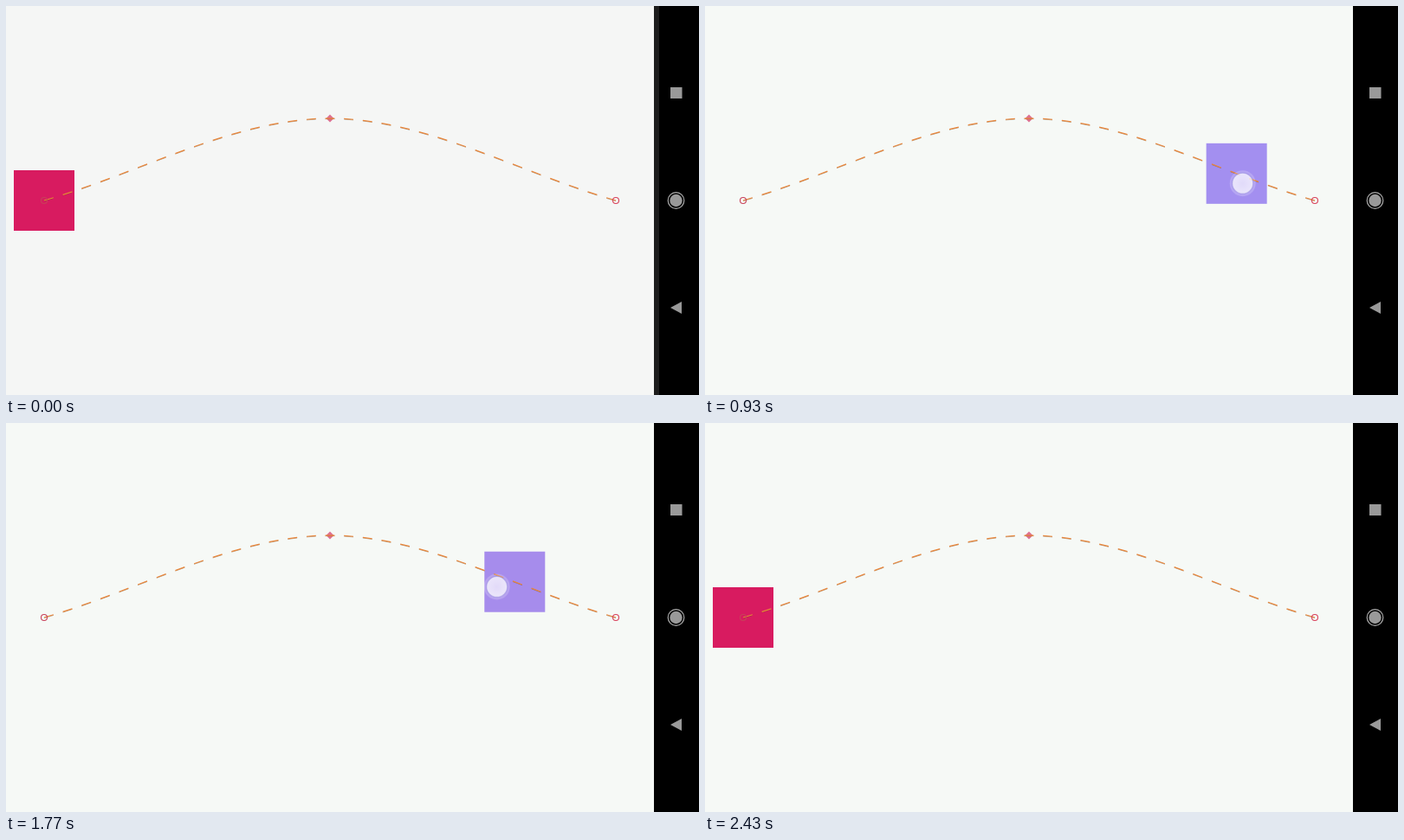
Recreate the animation shown at these times as an HTML page with a canvas. Size 800 by 450 pixels, loop 4.43 s.

```html
<!DOCTYPE html>
<html lang="en">
<head>
<meta charset="utf-8">
<title>Square on a curved path</title>
<style>
  html, body { margin: 0; width: 100%; height: 100%; overflow: hidden; background: #f6f9f6; }
  canvas { display: block; width: 800px; height: 450px; }
</style>
</head>
<body>
<canvas id="stage" width="800" height="450"></canvas>
<script>
const ctx = document.getElementById('stage').getContext('2d');
const LOOP = 4430, PRESS = 430;
const START = 44, END = 704, MIDDLE = (START + END) / 2, BASE = 225, RISE = 95;
const SEGMENTS = 61;

// Keys are [time, value, ...].
const squareKeys = [[430, 44], [670, 220.5], [930, 613], [1130, 698], [1270, 704],
  [1530, 704], [1770, 588], [2030, 248], [2250, 62], [2430, 44]];
const touches = [
  [[430, 48, 236], [670, 237.5, 171], [930, 620, 205], [1100, 698, 242], [1240, 704, 258]],
  [[1530, 703, 237], [1770, 567.5, 189.5], [2030, 213.5, 181], [2230, 70, 225]]
];

// Monotone cubic interpolation, at rest at both ends.
function interpolate(keys, t, column = 1) {
  const last = keys.length - 1;
  if (t <= keys[0][0]) return keys[0][column];
  if (t >= keys[last][0]) return keys[last][column];
  const secant = i => (keys[i + 1][column] - keys[i][column]) / (keys[i + 1][0] - keys[i][0]);
  const tangent = i => {
    if (i === 0 || i === last) return 0;
    const a = secant(i - 1), b = secant(i);
    return a * b > 0 ? 2 * a * b / (a + b) : 0;
  };
  const i = keys.findIndex(key => key[0] > t) - 1;
  const span = keys[i + 1][0] - keys[i][0], u = (t - keys[i][0]) / span;
  const ease = u * u * (3 - 2 * u);
  return keys[i][column] * (1 - ease) + keys[i + 1][column] * ease
    + span * u * (1 - u) * ((1 - u) * tangent(i) - u * tangent(i + 1));
}

function pathY(x) {
  const u = 1 - Math.abs(x - MIDDLE) / (MIDDLE - START);
  return BASE - RISE * (u + u * u - u * u * u);
}

// Blends the two end colours in linear light.
function squareColor(progress) {
  const from = [216, 27, 96], to = [153, 153, 255];
  const mixed = from.map((c, i) => {
    const light = c ** 2.2 * (1 - progress) + to[i] ** 2.2 * progress;
    return Math.round(light ** (1 / 2.2));
  });
  return `rgb(${mixed})`;
}

function disc(x, y, r, fill) {
  ctx.beginPath();
  ctx.arc(x, y, r, 0, 2 * Math.PI);
  ctx.fillStyle = fill;
  ctx.fill();
}

function ring(x, y, r, color, width) {
  ctx.beginPath();
  ctx.arc(x, y, r, 0, 2 * Math.PI);
  ctx.strokeStyle = color;
  ctx.lineWidth = width;
  ctx.stroke();
}

function polygon(points, color) {
  ctx.beginPath();
  points.forEach(([x, y]) => ctx.lineTo(x, y));
  ctx.closePath();
  ctx.fillStyle = color;
  ctx.fill();
}

function dashes(color, width, shift) {
  const step = (END - START) / SEGMENTS;
  ctx.beginPath();
  for (let i = 0; i < SEGMENTS; i += 2) {
    const x = START + i * step;
    ctx.moveTo(x, pathY(x) + shift);
    ctx.lineTo(x + step, pathY(x + step) + shift);
  }
  ctx.strokeStyle = color;
  ctx.lineWidth = width;
  ctx.stroke();
}

function drawPath() {
  const top = BASE - RISE;
  polygon([[MIDDLE - 4.5, top], [MIDDLE, top - 4.5], [MIDDLE + 4.5, top], [MIDDLE, top + 4.5]], '#df7190');
  dashes('rgba(90,60,20,.4)', 1, 0.6);
  dashes('#e8853a', 1.2, 0);
  ring(START, BASE, 3.5, '#c8405a', 1.1);
  ring(END, BASE, 3.5, '#d8405a', 1.1);
}

function drawTouch(keys, t) {
  if (t < keys[0][0] || t >= keys[keys.length - 1][0]) return;
  const x = interpolate(keys, t, 1), y = interpolate(keys, t, 2);
  disc(x, y, 15, 'rgba(255,255,255,.2)');
  const glow = ctx.createRadialGradient(x, y, 0, x, y, 12);
  glow.addColorStop(0, 'rgba(255,255,255,.6)');
  glow.addColorStop(1, 'rgba(255,255,255,.72)');
  disc(x, y, 12, glow);
  ring(x, y, 12, 'rgba(145,135,220,.5)', 1.2);
}

function drawNavigation(edge) {
  ctx.fillStyle = '#000';
  ctx.fillRect(748, 0, 52, 450);
  ctx.fillStyle = edge;
  ctx.fillRect(748, 0, 6, 450);
  ctx.fillStyle = '#999';
  ctx.fillRect(767, 94, 13.5, 13);
  disc(773.5, 225, 7.2, '#999');
  ring(773.5, 225, 9.3, '#aaa', 1.2);
  polygon([[767, 349], [780, 342], [780, 356]], '#999');
}

function draw(t) {
  const idle = t < PRESS;
  ctx.fillStyle = idle ? '#f5f6f5' : '#f6f9f6';
  ctx.fillRect(0, 0, 800, 450);
  const x = interpolate(squareKeys, t);
  ctx.fillStyle = squareColor((x - START) / (END - START));
  ctx.fillRect(x - 35, pathY(x) - 35, 70, 70);
  drawPath();
  touches.forEach(keys => drawTouch(keys, t));
  drawNavigation(idle ? '#1c1c1c' : '#000');
}

const begin = performance.now();
function frame() {
  draw((performance.now() - begin) % LOOP);
  requestAnimationFrame(frame);
}
frame();
</script>
</body>
</html>
```
